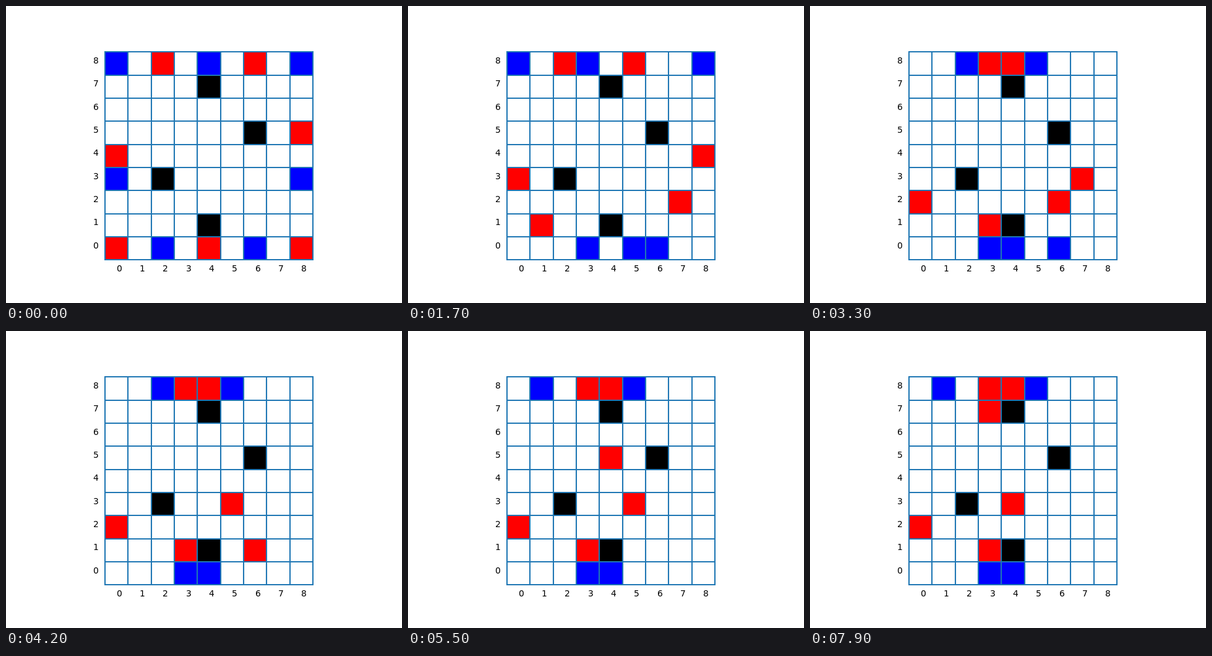
Animation, 640 px wide and 480 px high, one loop 8000 ms. Source, as an HTML page with a canvas:

```html
<!DOCTYPE html>
<html>
<head>
<meta charset="utf-8">
<style>
html, body { margin: 0; width: 100%; height: 100%; overflow: hidden; background: #fff; }
canvas { display: block; }
</style>
</head>
<body>
<canvas id="stage" width="640" height="480"></canvas>
<script>
const ctx = document.getElementById('stage').getContext('2d');
const SIZE = 9, CELL = 112 / 3, LEFT = 160, BOTTOM = 410.4, STEP = 100, LOOP = 8000;
const STEPS = { R: [1, 0], L: [-1, 0], U: [0, 1], D: [0, -1] };
const START = {
  red: '00 40 80 04 85 28 68',
  blue: '20 60 03 83 08 48 88',
  black: '41 23 65 47'
};

// Each move: column, row, direction. The sides take turns.
const moves = (
  '20R 00U 60L 80U 83L 81U 73D 85D 72D 01R 71D 82L 70L 68L 03R 04D 48L 58L 88L 28R ' +
  '08R 03D 18R 84D 78L 72L 68L 83L 28L 11R 18R 21R 50L 73L 60L 63L 50U 53D 28L 62D ' +
  '18R 52U 28L 53U 18R 54U 28L 55L 18R 61U 28L 62U 18R 63L 28L 45U 18R 46L 28L 53L ' +
  '18R 36U 28L 37D '.repeat(5)
).trim().split(' ');

const colX = c => Math.round(LEFT + c * CELL);
const rowY = r => Math.round(BOTTOM - r * CELL);
const at = (x, y) => x + ',' + y;

function play(board, move) {
  const [dx, dy] = STEPS[move[2]];
  const x = +move[0] + dx, y = +move[1] + dy;
  const from = at(x - dx, y - dy), side = board[from];
  delete board[from];
  board[at(x, y)] = side;

  // A piece caught between the mover and an ally or a block is removed.
  for (const [sx, sy] of Object.values(STEPS)) {
    const near = at(x + sx, y + sy), far = board[at(x + 2 * sx, y + 2 * sy)];
    const enemy = board[near] && board[near] !== side && board[near] !== 'black';
    if (enemy && (far === side || far === 'black')) delete board[near];
  }
}

function boardAfter(count) {
  const board = {};
  for (const side in START)
    for (const [x, y] of START[side].split(' ')) board[at(x, y)] = side;
  moves.slice(0, count).forEach(move => play(board, move));
  return board;
}

function drawGrid() {
  ctx.strokeStyle = '#1f77b4';
  ctx.lineWidth = 2.083;
  ctx.lineCap = 'square';
  ctx.beginPath();
  for (let i = 0; i <= SIZE; i++) {
    ctx.moveTo(colX(i), rowY(0));
    ctx.lineTo(colX(i), rowY(SIZE));
    ctx.moveTo(colX(0), rowY(i));
    ctx.lineTo(colX(SIZE), rowY(i));
  }
  ctx.stroke();
}

function drawLabels() {
  ctx.fillStyle = '#000';
  ctx.font = '13.889px "DejaVu Sans", sans-serif';
  for (let i = 0; i < SIZE; i++) {
    ctx.fillText(i, colX(i + 0.5), rowY(-0.5));
    ctx.fillText(i, colX(-0.5), rowY(i + 0.5));
  }
}

function draw(count) {
  ctx.fillStyle = '#fff';
  ctx.fillRect(0, 0, 640, 480);
  const board = boardAfter(count);
  for (const key in board) {
    const [c, r] = key.split(',').map(Number);
    ctx.fillStyle = board[key];
    ctx.fillRect(colX(c), rowY(r + 1), colX(c + 1) - colX(c), rowY(r) - rowY(r + 1));
  }
  drawGrid();
  drawLabels();
}

const begin = performance.now();
function tick() {
  draw(Math.floor((performance.now() - begin) % LOOP / STEP));
  requestAnimationFrame(tick);
}
tick();
</script>
</body>
</html>
```
